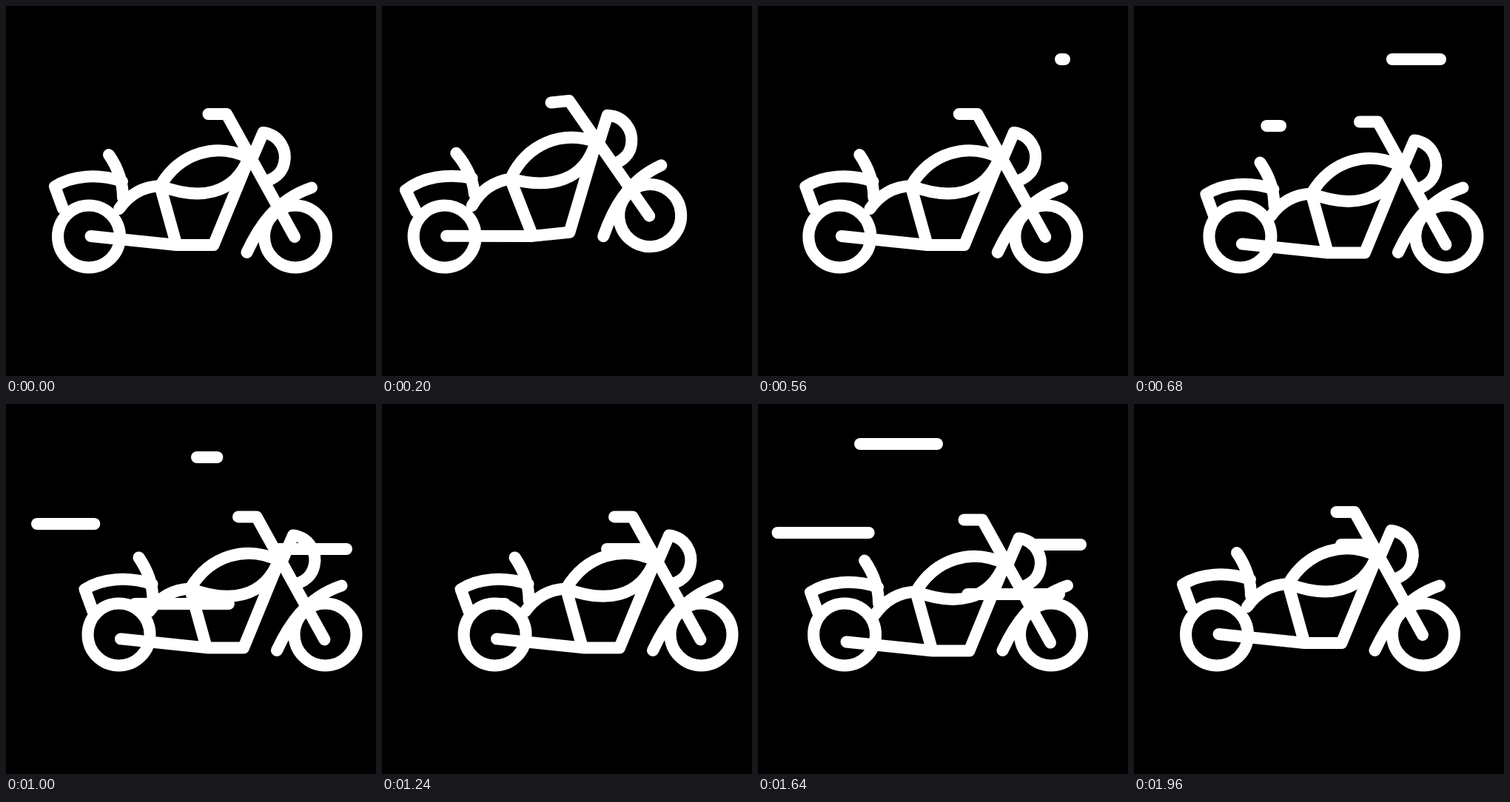
Recreate the animation shown at these times as an HTML page. Size 500x500 px, loop 2 s.

```html
<!DOCTYPE html>
<html lang="en">
<head>
<meta charset="utf-8">
<title>Motorcycle</title>
<style>
html, body { margin: 0; width: 100%; height: 100%; overflow: hidden; background: #000; }
svg { display: block; width: 100%; height: 100%; }
g { fill: none; stroke: #fff; stroke-width: 16; stroke-linecap: round; stroke-linejoin: round; }
</style>
</head>
<body>
<svg viewBox="0 0 500 500">
  <g id="wind"></g>
  <g id="bike">
    <circle cx="112" cy="311.5" r="42"/>
    <circle cx="391" cy="311.5" r="42"/>
    <path d="M325.5 333C341 300 364 262 413 245.5"/>
    <g id="body">
      <path d="M114.5 311L230.5 323H280.5L326 212M230.5 323L208.5 244"/>
      <path d="M208.5 243C235 198 284 184 328 205C308 256 261 263 208.5 243C186 244 167 254 153 274"/>
      <path d="M139 201C150 217 158 237 158 259M77 274L66 244C89 229 124 226 157 237"/>
      <path d="M273.5 146H298L390 312M332.5 206L347.5 171C370 174 380 195 376 212C373 226 364 232 354 236"/>
    </g>
  </g>
</svg>
<script>
const $ = id => document.getElementById(id);
const LOOP = 2000, SPAN = 156;

// Wind streaks: start time, right end, height
const streaks = [
  [520, 414, 72], [600, 198, 162], [725, 310, 270], [800, 460, 196],
  [1280, 294, 54], [1320, 178, 174], [1380, 412, 257], [1480, 436, 190]
].map(([start, x, y]) => {
  const path = document.createElementNS("http://www.w3.org/2000/svg", "path");
  $("wind").append(path);
  return { start, x, y, path };
});

// Eased progress from time a to time b
const ease = (t, a, b) => {
  const u = Math.min(1, Math.max(0, (t - a) / (b - a)));
  return (1 - Math.cos(Math.PI * u)) / 2;
};

function draw(now) {
  const t = now % LOOP;
  const dx = -44.5 * ease(t, 0, 350) + 85 * ease(t, 350, 770) - 40.5 * ease(t, 1240, 1760);
  const tilt = -9.1 * (ease(t, 0, 340) - ease(t, 340, 560));
  const bounce = t > 585 && t < 1785 ? 5.8 * (1 - Math.cos((t - 585) / 240 * 2 * Math.PI)) : 0;
  $("bike").setAttribute("transform", `translate(${dx} 0) rotate(${tilt} 112 311.5)`);
  $("body").setAttribute("transform", `translate(0 ${bounce})`);

  for (const { start, x, y, path } of streaks) {
    const age = t - start;
    const head = x - SPAN * ease(age, 0, 360);
    const tail = x - SPAN * ease(age, 220, 580);
    path.setAttribute("d", age > 0 && age < 580 ? `M${tail} ${y}H${head}` : "");
  }
  requestAnimationFrame(draw);
}
requestAnimationFrame(draw);
</script>
</body>
</html>
```
